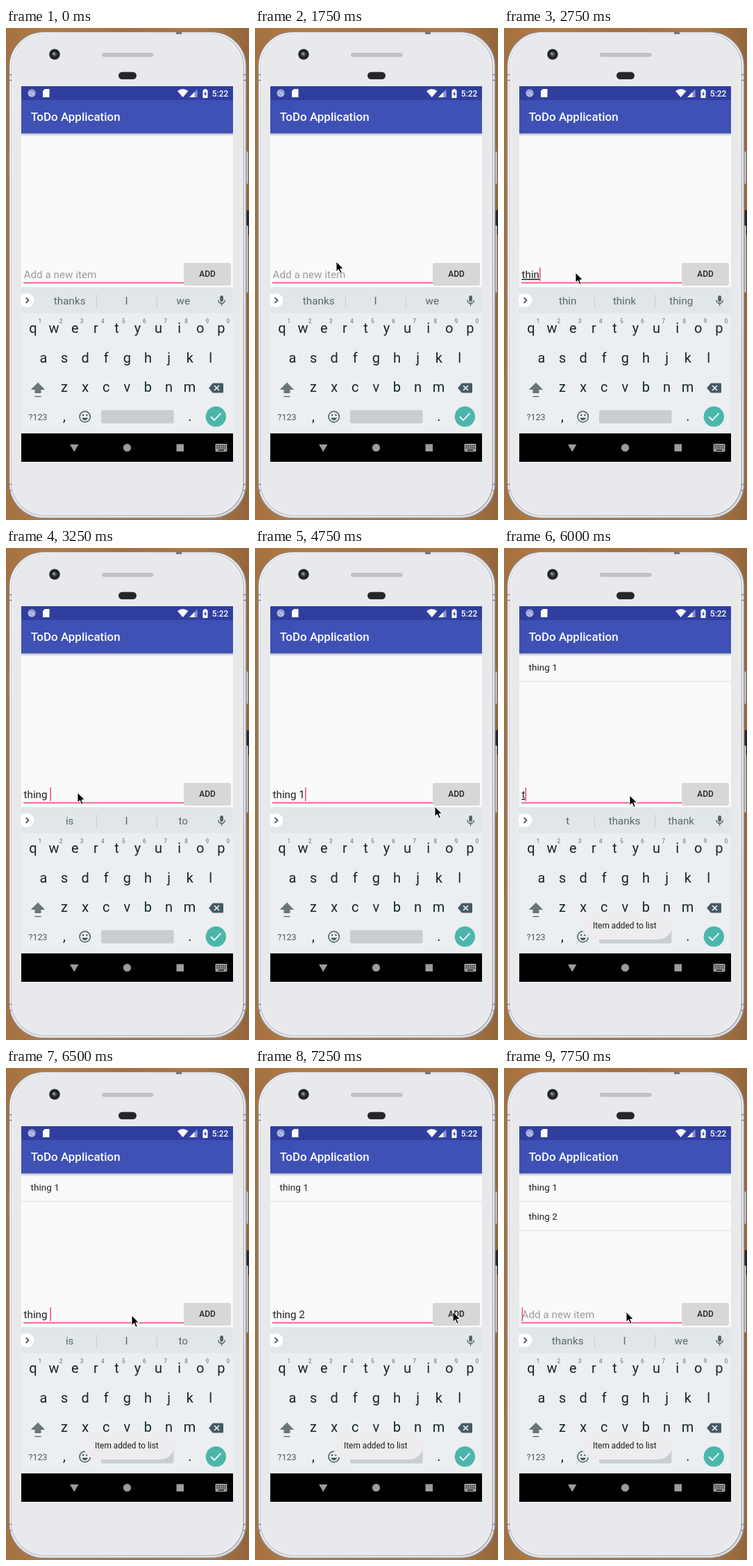
Write an HTML page that moves like this. It is 350 px wide and 710 px high and loops after 8 s.

```html
<!DOCTYPE html>
<html>
<head>
<meta charset="utf-8">
<style>
html, body { margin: 0; width: 100%; height: 100%; overflow: hidden; background: #a9713f; }
svg { display: block; width: 350px; height: 710px; font-family: Roboto, sans-serif; }
text { white-space: pre; }
</style>
</head>
<body>
<svg id="stage" viewBox="0 0 350 710">
  <defs>
    <linearGradient id="wood">
      <stop offset="0" stop-color="#a5713f"/><stop offset=".2" stop-color="#b47d47"/>
      <stop offset=".5" stop-color="#a56f3f"/><stop offset=".8" stop-color="#b07945"/>
      <stop offset="1" stop-color="#94653a"/>
    </linearGradient>
    <linearGradient id="bevel" x2="1" y2="1">
      <stop offset="0" stop-color="#d9d9dc"/><stop offset=".5" stop-color="#c9c8cc"/>
      <stop offset="1" stop-color="#b2b0b5"/>
    </linearGradient>
    <linearGradient id="shadow" x2="0" y2="1">
      <stop offset="0" stop-color="#000" stop-opacity=".28"/><stop offset="1" stop-color="#000" stop-opacity="0"/>
    </linearGradient>
    <radialGradient id="lens">
      <stop offset="0" stop-color="#6f7780"/><stop offset=".35" stop-color="#3b4249"/>
      <stop offset=".65" stop-color="#1a1c1f"/><stop offset="1" stop-color="#303235"/>
    </radialGradient>
  </defs>
  <rect width="350" height="710" fill="url(#wood)"/>
  <g id="grain"></g>

  <!-- phone body -->
  <rect x="344" y="178" width="4.500" height="47" rx="1.500" fill="#d9dadd" stroke="#8d8d90" stroke-width=".7"/>
  <path d="M345 263h5v36h-5z" fill="#2a2522"/>
  <rect x="344" y="285" width="4.500" height="97" rx="1.500" fill="#d9dadd" stroke="#8d8d90" stroke-width=".7"/>
  <rect x="4.500" y="5.500" width="341.500" height="702" rx="50" fill="url(#bevel)" stroke="#858488" stroke-width="1.200"/>
  <rect x="6.500" y="7.500" width="337.500" height="697.500" rx="48" fill="none" stroke="#f3f3f5" stroke-width="1.500"/>
  <rect x="9.500" y="10" width="331" height="692" rx="46" fill="#e8e9ed" stroke="#f2f2f4" stroke-width="1.500"/>
  <path d="M4.500 67.500h4M4.500 75.500h4M342 67.500h4M342 75.500h4M4.500 658.500h4M4.500 667.500h4M342 658.500h4M342 667.500h4" stroke="#838388" stroke-width="1.300"/>
  <rect x="245" y="5" width="8" height="4" fill="#77777b"/>
  <circle cx="70" cy="38" r="7.800" fill="url(#lens)"/>
  <circle cx="69" cy="37" r="2" fill="#878f97"/>
  <rect x="138.500" y="36.500" width="73.500" height="4.500" rx="2.200" fill="#c3c4c8" stroke="#adaeb2" stroke-width=".8"/>
  <rect x="162" y="63.500" width="26" height="10.500" rx="5.200" fill="#26272a"/>

  <!-- app -->
  <rect x="22" y="84" width="305" height="542" fill="#fafafa"/>
  <rect x="22" y="84" width="305" height="20" fill="#303f9f"/>
  <rect x="22" y="104" width="305" height="48" fill="#3f51b5"/>
  <rect x="22" y="152" width="305" height="4" fill="url(#shadow)"/>
  <circle cx="37" cy="94" r="5.500" fill="#b9c0e0"/>
  <path d="M33 92q4-3 7 1t2 3M33 95q3-2 5 3M36 90q4 0 5 4" fill="none" stroke="#7783c2"/>
  <g fill="#fff">
    <path d="M56 88h6.500v12h-9.500V91z"/>
    <path d="M247 91q7.500-6 15.500 0L254.700 100z"/>
    <path d="M264 100L275.500 88.500V100z" opacity=".45"/><path d="M264 100l7.500-7.500v7.500z"/>
    <path d="M283.500 89.500h2V88h3v1.500h2V101h-7z"/>
    <path d="M287.500 91l-2.500 4.500h1.700V99l2.500-4.500h-1.700z" fill="#303f9f"/>
    <text x="296.800" y="99" font-size="11.860" font-weight="500">5:22</text>
    <text x="35.800" y="134" font-size="16.940" font-weight="500">ToDo Application</text>
  </g>
  <rect x="25" y="367" width="231" height="1.500" fill="#e5487f"/>

  <!-- keyboard -->
  <rect x="22" y="374" width="305" height="212" fill="#eceff1"/>
  <rect x="22" y="374" width="305" height="37.500" fill="#e1e6e9"/>
  <circle cx="30.500" cy="393" r="10" fill="#fff"/><path d="M22 383h2v20h-2z" fill="#fff"/>
  <path d="M28.500 389l4 4-4 4" fill="none" stroke="#37474f" stroke-width="1.700"/>
  <rect x="308.300" y="386" width="4.600" height="9" rx="2.300" fill="#546068"/>
  <path d="M305.800 392.500a4.800 4.800 0 0 0 9.600 0M310.600 397.300V401" fill="none" stroke="#546068" stroke-width="1.400"/>
  <g id="keys" fill="#14262e" text-anchor="middle"></g>
  <path d="M46 511.500l10.200 10.500H50.500v5h-9v-5h-5.700zM41.500 531h9v1.500h-9z" fill="#6a757b"/>
  <path d="M298 512.500h14q1 0 1 1v12q0 1-1 1h-14l-6-7z" fill="#455a64"/>
  <path d="M300 516l7 7M307 516l-7 7" stroke="#eceff1" stroke-width="1.700"/>
  <text x="32.500" y="565.500" font-size="12.500" fill="#455a64">?123</text>
  <circle cx="113.700" cy="561" r="7.700" fill="none" stroke="#455a64" stroke-width="1.500"/>
  <path d="M109.300 562.500h8.800q-1.400 3.600-4.400 3.600t-4.400-3.600zM110 557.500h2.200v2.200H110zM115.300 557.500h2.200v2.200h-2.200z" fill="#455a64"/>
  <rect x="137" y="551.500" width="104.500" height="19" rx="2" fill="#c8cdd0"/>
  <circle cx="302.300" cy="560.800" r="14.700" fill="#4db6ac"/>
  <path d="M295 561l5 5 9.500-10" fill="none" stroke="#fff" stroke-width="1.800"/>

  <!-- navigation bar -->
  <rect x="22" y="585" width="305" height="41" fill="#000"/>
  <g fill="#9c9c9c">
    <path d="M92 601h12.500l-6.200 10.500z"/><circle cx="174.500" cy="605.700" r="5.600"/>
    <rect x="245.500" y="600.500" width="10.500" height="10.500"/>
    <rect x="301.500" y="600" width="17" height="11.500" rx="1.500"/>
  </g>
  <path d="M303.500 603h13M303.500 606h13" stroke="#000" stroke-width="1.500" stroke-dasharray="1.500 1.350"/>
  <path d="M306 609.200h8" stroke="#000" stroke-width="1.300"/>

  <g id="live"></g>
  <text id="entry" x="25.500" y="361" font-size="15.250"></text>
  <rect id="caret" y="345.500" width="1.500" height="20" fill="#f0447f"/>
  <path id="pointer" d="M0 0V14.500l3.400-3.200 2.500 5.800 2.400-1-2.500-5.600h4.600z" fill="#000" stroke="#fff" stroke-width="1"/>
</svg>
<script>
const $ = id => document.getElementById(id);
const LOOP = 8000;

// [start ms, field text, caret shown, pointer x, pointer y, items in list, button pressed]
const STEPS = [
  [0, '', 0, null, 0, 0],
  [250, '', 1, 261, 212, 0],
  [500, '', 1, 158, 308, 0],
  [750, '', 0, 117, 337, 0],
  [1250, '', 1, 117, 337, 0],
  [1750, '', 0, 117, 337, 0],
  [2250, 't', 1, 112, 343, 0],
  [2500, 'th', 1, 103, 353, 0],
  [2750, 'thin', 1, 103, 353, 0],
  [3000, 'thing', 1, 103, 353, 0],
  [3250, 'thing ', 1, 103, 353, 0],
  [3750, 'thing 1', 1, 103, 353, 0],
  [4250, 'thing 1', 0, 130, 360, 0],
  [4500, 'thing 1', 0, 220, 373, 0],
  [4750, 'thing 1', 1, 259, 373, 0],
  [5000, 'thing 1', 1, 284, 356, 0],
  [5250, '', 1, 284, 356, 1, 1],
  [5500, '', 1, 240, 357, 1],
  [5750, '', 0, 181, 357, 1],
  [6000, 't', 1, 181, 357, 1],
  [6250, 'thing', 1, 181, 357, 1],
  [6500, 'thing ', 1, 181, 357, 1],
  [6750, 'thing 2', 1, 181, 357, 1],
  [7000, 'thing 2', 1, 250, 355, 1],
  [7250, 'thing 2', 0, 285, 352, 1],
  [7500, '', 1, 285, 352, 2, 1],
  [7750, '', 1, 176, 352, 2]
];
const SUGGESTIONS = {
  '': ['thanks', 'I', 'we'],
  't': ['t', 'thanks', 'thank'],
  'th': ['th', 'the', 'that'],
  'thin': ['thin', 'think', 'thing'],
  'thing': ['thing', 'things', 'think'],
  'thing ': ['is', 'I', 'to']
};

const label = (x, y, size, content, extra = '') =>
  `<text x="${x}" y="${y}" font-size="${size}" ${extra}>${content}</text>`;

function buildKeys() {
  const rows = [['qwertyuiop', 39, 440], ['asdfghjkl', 54, 483], ['zxcvbnm', 84, 525]];
  let keys = label(84, 567, 20, ',') + label(265, 567, 20, '.');
  for (const [letters, x, y] of rows)
    [...letters].forEach((letter, i) => { keys += label(x + i * 30.1, y, 20, letter); });
  for (let i = 0; i < 10; i++)
    keys += label(49 + i * 30.1, 426, 8.5, (i + 1) % 10, 'fill="#7d898f" font-weight="500"');
  $('keys').innerHTML = keys;
}

function buildGrain() {
  let seed = 7, lines = '';
  const random = () => (seed = seed * 16807 % 2147483647) / 2147483647;
  for (let i = 0; i < 70; i++) {
    const x = random() * 350, y = random() * 710;
    lines += `<path d="M${x} ${y}v${30 + random() * 130}" stroke="${i % 2 ? '#8b5930' : '#c68e56'}" opacity=".4"/>`;
  }
  $('grain').innerHTML = lines;
}

function show([, text, caretOn, x, y, items, pressed]) {
  let live = `<rect x="256" y="339" width="68" height="31.5" rx="1.5" fill="${pressed ? '#c9caca' : '#d6d7d7'}"/>`
    + '<path d="M257 371h66" stroke="#000" opacity=".18"/>'
    + label(290, 358.8, 11.86, 'ADD', 'text-anchor="middle" font-weight="500" fill="#222"');
  for (let i = 0; i < items; i++) {
    live += label(35.5, 177.2 + i * 41.8, 13.55, `thing ${i + 1}`, 'fill="#212121"')
      + `<path d="M22 ${192.5 + i * 42}h305" stroke="#dedede"/>`;
  }
  const words = SUGGESTIONS[text];
  if (words) {
    live += '<path d="M130.500 384v20M217.500 384v20" stroke="#c8ced1"/>';
    words.forEach((word, i) => {
      live += label([91.7, 173.5, 255.2][i], 399, 15.25, word, 'text-anchor="middle" fill="#5a666d"');
    });
  }
  if (items)
    live += '<rect x="112" y="525" width="130" height="40" rx="20" fill="#eeecef"/>'
      + label(128, 549, 11.86, 'Item added to list', 'fill="#1c1c1c"');
  $('live').innerHTML = live;

  const entry = $('entry');
  entry.textContent = text || 'Add a new item';
  entry.setAttribute('fill', text ? '#212121' : '#9b9b9b');
  entry.style.textDecoration = /^\w+$/.test(text) ? 'underline' : 'none';
  $('caret').setAttribute('x', 25.6 + (text ? entry.getComputedTextLength() : 0));
  $('caret').style.display = caretOn ? '' : 'none';
  $('pointer').style.display = x === null ? 'none' : '';
  $('pointer').setAttribute('transform', `translate(${x || 0} ${y})`);
}

let current;
function tick() {
  const time = performance.now() % LOOP;
  const step = STEPS.filter(s => s[0] <= time).pop();
  if (step !== current) show(current = step);
  requestAnimationFrame(tick);
}
buildGrain();
buildKeys();
tick();
</script>
</body>
</html>
```
